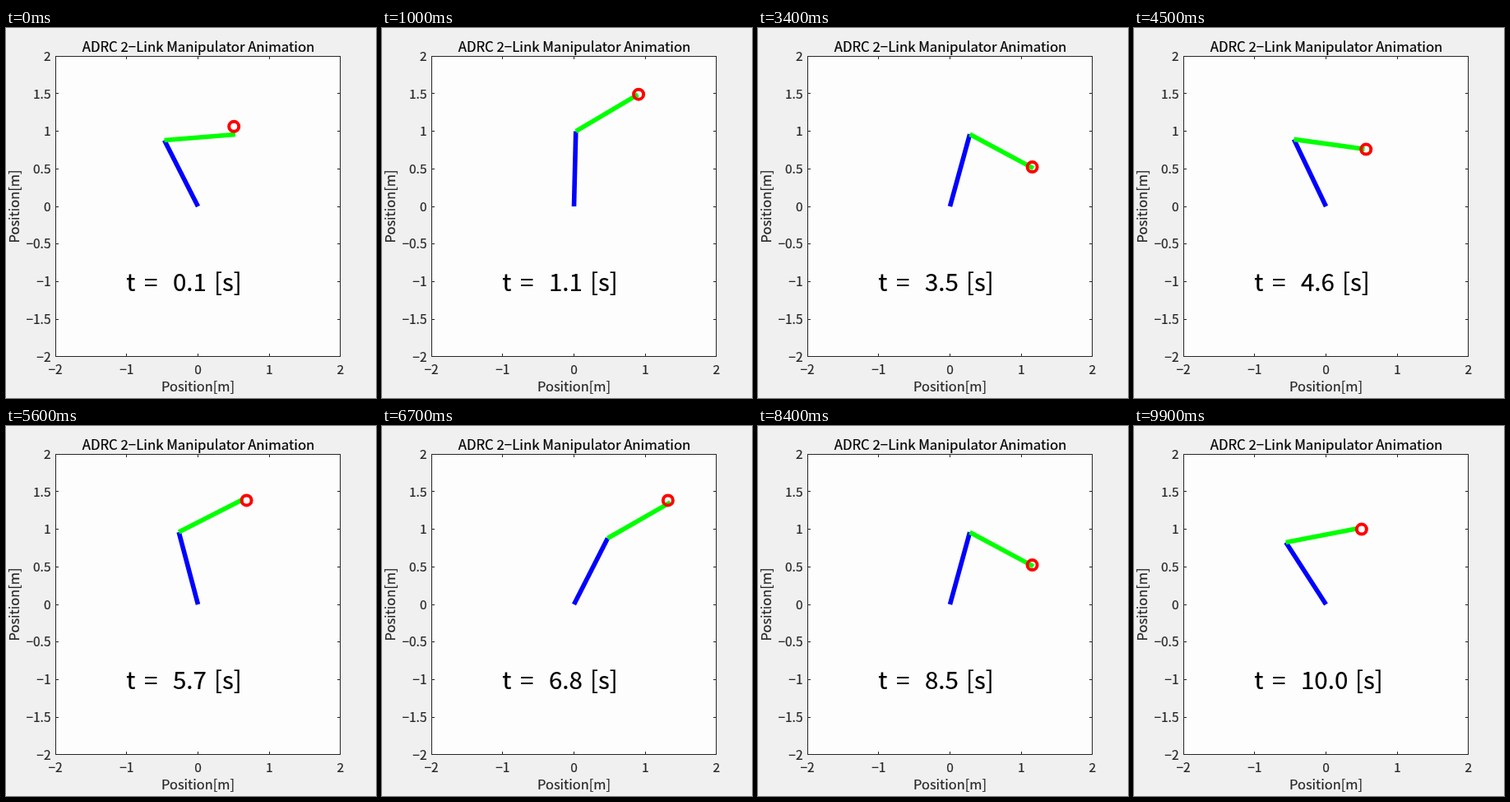
Recreate the animation shown at these times as an HTML page. Size 450 by 450 pixels, loop 10 s.

```html
<!DOCTYPE html>
<html lang="en">
<head>
<meta charset="utf-8">
<title>Manipulator animation</title>
<style>
  html, body { margin: 0; width: 100%; height: 100%; overflow: hidden; background: #f0f0f0; }
  svg { display: block; width: 450px; height: 450px; }
  text {
    font-family: "Noto Sans CJK JP", "Noto Sans CJK", "Noto Sans", sans-serif;
    fill: #262626; stroke: #262626; stroke-width: 0.2px;
  }
  .tick { font-size: 15.5px; }
  .label { font-size: 16.4px; text-anchor: middle; }
  .title { font-size: 16.8px; text-anchor: middle; fill: #000; stroke: #000; }
  .clock { font-size: 29.5px; fill: #000; stroke: #000; }
  .link { fill: none; stroke-width: 5.6; }
</style>
</head>
<body>
<svg viewBox="0 0 450 450">
  <rect x="60.5" y="34.5" width="346" height="365" fill="#fdfdfd" stroke="#262626"/>
  <g id="axes"></g>
  <text class="title" x="234" y="28.5">ADRC 2−Link Manipulator Animation</text>
  <text class="label" x="233.5" y="442">Position[m]</text>
  <text class="label" transform="translate(16 217) rotate(-90)">Position[m]</text>
  <path id="upper" class="link" stroke="#00f"/>
  <path id="fore" class="link" stroke="#0f0"/>
  <circle id="goal" r="6" fill="none" stroke="#f00" stroke-width="4"/>
  <text class="clock" x="146.3" y="320">t</text>
  <text class="clock" x="168" y="320">=</text>
  <text class="clock" id="secs" x="203" y="320"></text>
  <text class="clock" id="unit" y="320">[s]</text>
</svg>
<script>
const $ = id => document.getElementById(id);
const px = x => 233.5 + 86.7 * x;
const py = y => 217 - 91.4 * y;

// Axis ticks and numbers
let ticks = '', path = '';
const num = v => String(v).replace('-', '−');
for (let v = -2; v <= 2; v++) {
  const x = Math.round(px(v) - 0.5) + 0.5;
  if (Math.abs(v) < 2) path += `M${x} 34v4M${x} 400v-4`;
  ticks += `<text class="tick" text-anchor="middle" x="${px(v)}" y="420.5">${num(v)}</text>`;
}
for (let v = -2; v <= 2; v += 0.5) {
  const y = Math.round(py(v) - 0.5) + 0.5;
  if (Math.abs(v) < 2) path += `M60 ${y}h4M407 ${y}h-4`;
  ticks += `<text class="tick" text-anchor="end" x="54.5" y="${py(v) + 5.7}">${num(v)}</text>`;
}
$('axes').innerHTML = `<path d="${path}" stroke="#262626"/>` + ticks;

// The goal runs round a circle once in five seconds
function goal(t) {
  const a = 2 * Math.PI * t / 5;
  return [1 - 0.5 * Math.cos(a), 1 + 0.5 * Math.sin(a)];
}

// Joint angles that reach the goal with two links of length 1
function reach(t) {
  const [x, y] = goal(t);
  const half = Math.acos(Math.hypot(x, y) / 2);
  return [Math.atan2(y, x) + half, -2 * half];
}

// Real joints: the shoulder's acceleration disturbs both, plus a start-up offset
function joints(t) {
  const h = 0.1, s = t - 0.3;
  const accel = (reach(s - h)[0] - 2 * reach(s)[0] + reach(s + h)[0]) / (h * h);
  const settle = Math.exp((0.1 - t) / 0.4);
  const [q1, q2] = reach(t);
  return [q1 - 0.06 * accel - 0.092 * settle, q2 + 0.024 * accel - 0.068 * settle];
}

function draw(t) {
  const [q1, q2] = joints(t);
  const ex = Math.cos(q1), ey = Math.sin(q1);
  const tx = ex + Math.cos(q1 + q2), ty = ey + Math.sin(q1 + q2);
  const elbow = `${px(ex)} ${py(ey)}`;
  $('upper').setAttribute('d', `M${px(0)} ${py(0)}L${elbow}`);
  $('fore').setAttribute('d', `M${elbow}L${px(tx)} ${py(ty)}`);
  const [gx, gy] = goal(t);
  $('goal').setAttribute('cx', px(gx));
  $('goal').setAttribute('cy', py(gy));
  $('secs').textContent = t.toFixed(1);
  $('unit').setAttribute('x', t < 9.95 ? 253 : 269);
}

const start = performance.now();
function tick() {
  const step = Math.floor((performance.now() - start) / 100) % 100;
  draw((step + 1) / 10);
  requestAnimationFrame(tick);
}
tick();
</script>
</body>
</html>
```
